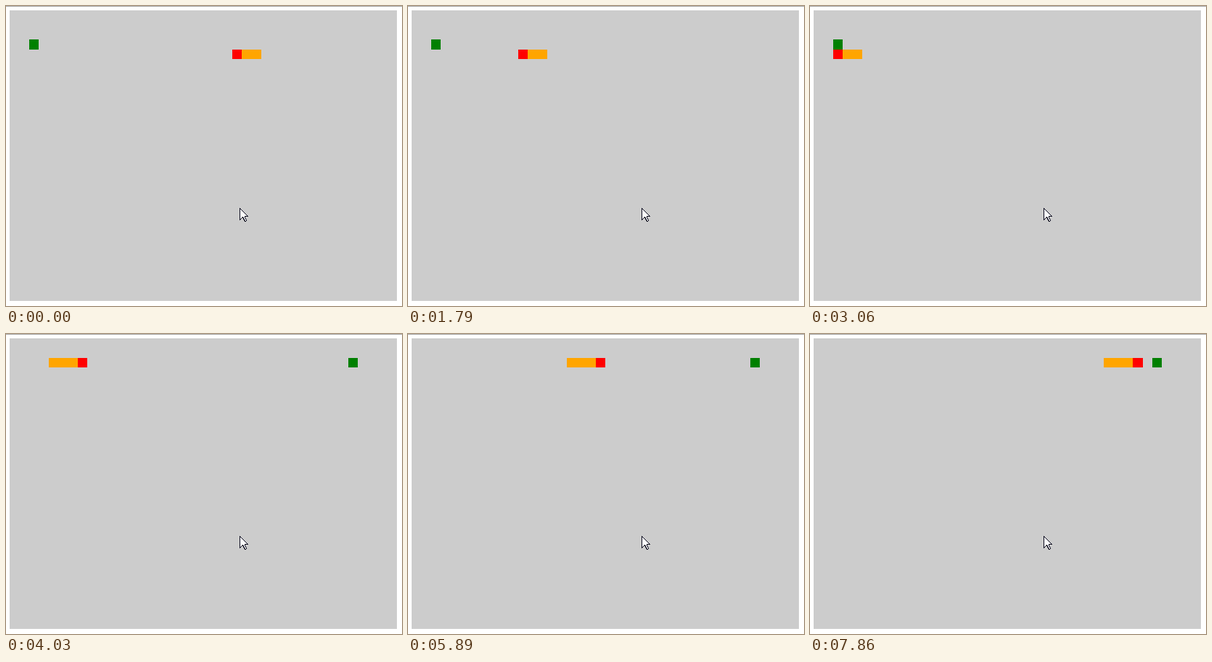
These frames come from a looping animation (546x413 px, 7990 ms). An HTML page with a canvas:

```html
<!DOCTYPE html>
<html lang="en">
<head>
<meta charset="utf-8">
<title>Snake</title>
<style>
  html, body { margin: 0; width: 100%; height: 100%; overflow: hidden; background: #fff; }
  canvas, svg { position: absolute; left: 0; top: 0; display: block; }
</style>
</head>
<body>
<canvas id="board" width="546" height="413"></canvas>
<svg width="546" height="413" viewBox="0 0 546 413">
  <path transform="translate(322.5 278.5)" d="M0 0V16L4 12L7 18H8L9 17L7 12V11H11Z"
        fill="#fff" stroke="#0a0a1e" shape-rendering="crispEdges"/>
</svg>
<script>
const LOOP = 7990;
const CELL = 40 / 3;
const EAT = 22;

// Evenly timed runs of redraws; a run may cover more cells than redraws.
const runs = [
  { from: 150, to: 1120, redraws: 8, cells: 8 },
  { from: 1270, to: 1790, redraws: 4, cells: 4 },
  { from: 1940, to: 2220, redraws: 3, cells: 3 },
  { from: 2360, to: 3060, redraws: 6, cells: 6 },
  { from: 3190, to: 3310, redraws: 2, cells: 2 },
  { from: 3460, to: 4300, redraws: 7, cells: 7 },
  { from: 4580, to: 4880, redraws: 3, cells: 4 },
  { from: 5160, to: 5460, redraws: 3, cells: 4 },
  { from: 5740, to: 7010, redraws: 10, cells: 10 },
  { from: 7160, to: 7860, redraws: 6, cells: 6 }
];

const ctx = document.getElementById("board").getContext("2d");
const edgeX = col => Math.round(16 / 3 + col * CELL);
const edgeY = row => Math.round(19 / 3 + row * CELL);

function fillCells(color, col, row, cols = 1, rows = 1) {
  const x = edgeX(col), y = edgeY(row);
  ctx.fillStyle = color;
  ctx.fillRect(x, y, edgeX(col + cols) - x, edgeY(row + rows) - y);
}

function cellsMoved(time) {
  let total = 0;
  for (const { from, to, redraws, cells } of runs) {
    if (time < from) break;
    const done = Math.floor((time - from) * (redraws - 1) / (to - from)) + 1;
    total += Math.round(cells * Math.min(done, redraws) / redraws);
  }
  return total;
}

// Path of the head: left along row 4, up two cells, right along row 2.
function headAt(n) {
  if (n < EAT) return [23 - n, 4];
  if (n === EAT) return [2, 3];
  return [n - 21, 2];
}

function draw(time) {
  const n = cellsMoved(time);
  const eaten = n >= EAT;
  const length = eaten ? 4 : 3;

  ctx.fillStyle = "#fff";
  ctx.fillRect(0, 0, 546, 413);
  ctx.fillStyle = "#a8a8a8";
  ctx.fillRect(0, 0, 546, 1);
  fillCells("#ccc", 0, 0, 40, 30);
  fillCells("green", ...(eaten ? [35, 2] : [2, 3]));
  for (let i = length - 1; i >= 0; i--) {
    fillCells(i ? "orange" : "red", ...headAt(n - i));
  }
}

const start = performance.now();
function tick() {
  draw((performance.now() - start) % LOOP);
  requestAnimationFrame(tick);
}
tick();
</script>
</body>
</html>
```
